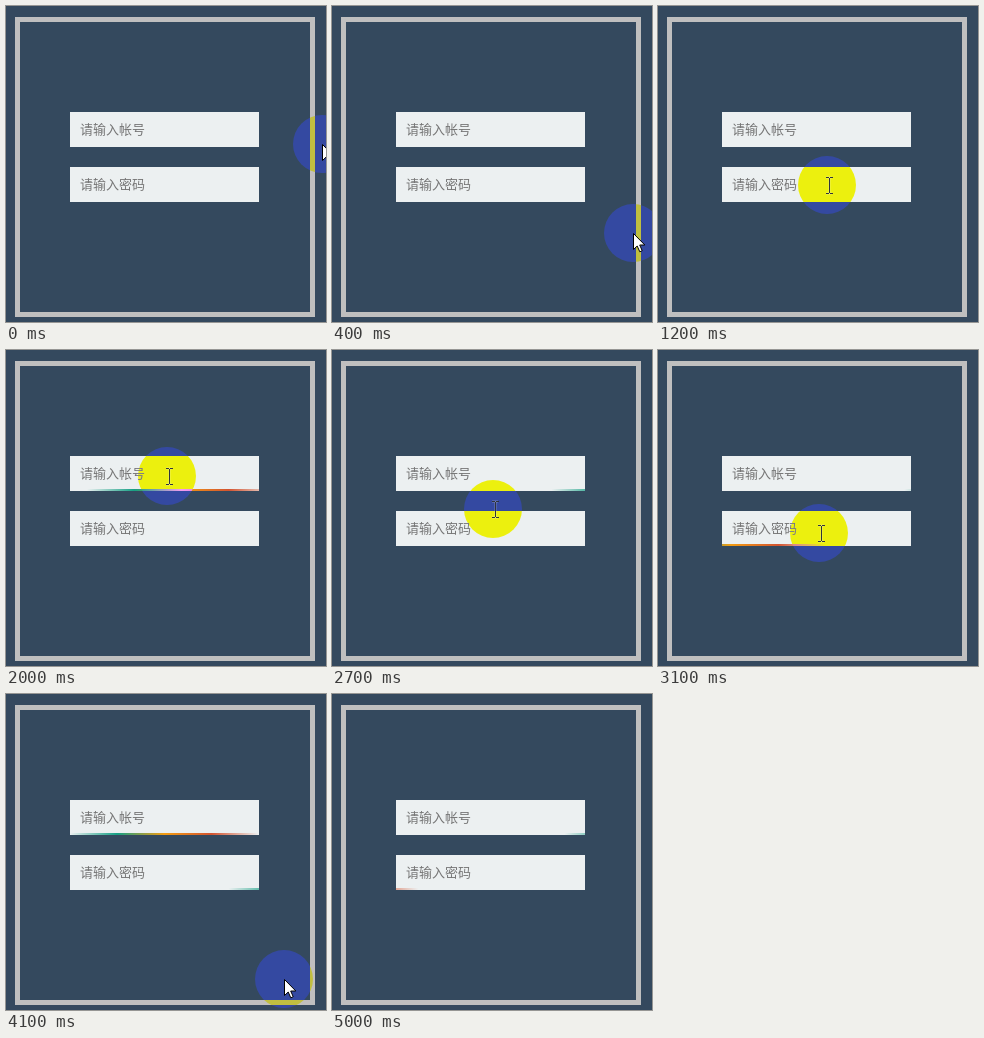
Write an HTML page that moves like this. It is 320 px wide and 316 px high and loops after 5100 ms.

```html
<!DOCTYPE html>
<html lang="zh">
<head>
<meta charset="utf-8">
<title>Login form</title>
<style>
  html, body { margin: 0; width: 100%; height: 100%; overflow: hidden; background: #34495e; }
  svg { display: block; }
  text { font: 13px "Noto Sans CJK SC", "Noto Sans CJK", sans-serif; fill: #757575; }
  #spot { fill: #00f; mix-blend-mode: difference; }
</style>
</head>
<body>
<svg width="320" height="316">
  <defs>
    <linearGradient id="rainbow">
      <stop offset="0" stop-color="#16a085" stop-opacity="0"/>
      <stop offset=".25" stop-color="#16a085"/>
      <stop offset=".5" stop-color="#f39c12"/>
      <stop offset=".75" stop-color="#d35430"/>
      <stop offset="1" stop-color="#d35430" stop-opacity="0"/>
    </linearGradient>
  </defs>
  <rect width="320" height="316" fill="#34495e"/>
  <rect x="11.5" y="13.5" width="295" height="295" fill="none" stroke="#bfbfbf" stroke-width="5"/>
  <svg x="64" y="106" width="189" height="35">
    <rect width="189" height="35" fill="#ecf0f1"/>
    <text x="10" y="22">请输入帐号</text>
    <rect class="line" y="33" width="189" height="2" fill="url(#rainbow)"/>
  </svg>
  <svg x="64" y="161" width="189" height="35">
    <rect width="189" height="35" fill="#ecf0f1"/>
    <text x="10" y="22">请输入密码</text>
    <rect class="line" y="33" width="189" height="2" fill="url(#rainbow)"/>
  </svg>
  <circle id="spot" r="29"/>
  <path id="arrow" d="M.5 .5V16.5L4.2 13L6.8 18.8L9.2 17.7L6.7 12H11.8Z" fill="#fff" stroke="#000"/>
  <g id="beam" fill="none">
    <path d="M-1 -7.5H5M-1 8.5H5M2.5 -7V8" stroke="#fff" stroke-opacity=".3" stroke-width="2"/>
    <path d="M-1 -7.5H2M3 -7.5H6M-1 8.5H2M3 8.5H6M2.5 -7V8" stroke="#30343c"/>
  </g>
</svg>
<script>
const LOOP = 5100, STEP = 100, SWEEP = 2150, WIDTH = 189;
const lineStarts = [1320, 2690];
const lines = document.querySelectorAll('.line');
const [spot, arrow, beam] = ['spot', 'arrow', 'beam'].map(id => document.getElementById(id));

// Pointer route: time, x, y
const route = [
  [0, 316, 138], [200, 316, 175], [400, 301, 227], [500, 270, 250], [600, 229, 255],
  [800, 145, 232], [900, 103, 195], [1000, 106, 158], [1100, 135, 148], [1200, 169, 179],
  [1300, 165, 148], [1400, 161, 126], [2500, 161, 126], [2700, 161, 159], [2900, 161, 183],
  [3700, 161, 183], [3900, 215, 235], [4200, 310, 310], [4300, 360, 355], [LOOP, 360, 355]
];

function pointerAt(t) {
  const i = route.findIndex(p => p[0] > t);
  const [t0, x0, y0] = route[i - 1], [t1, x1, y1] = route[i];
  const k = (t - t0) / (t1 - t0);
  return [x0 + (x1 - x0) * k, y0 + (y1 - y0) * k];
}

// The CSS "ease" curve, cubic-bezier(.25, .1, .25, 1)
function ease(x) {
  const bezier = (s, a, b) => 3 * (1 - s) ** 2 * s * a + 3 * (1 - s) * s * s * b + s ** 3;
  let low = 0, high = 1;
  for (let i = 0; i < 20; i++) {
    const mid = (low + high) / 2;
    if (bezier(mid, .25, .25) < x) low = mid; else high = mid;
  }
  return bezier(low, .1, 1);
}

function draw(now) {
  const t = Math.floor(now % LOOP / STEP) * STEP;

  lines.forEach((line, i) => {
    const age = Math.max(0, t - lineStarts[i]);
    line.setAttribute('x', WIDTH * (2 * ease(age % SWEEP / SWEEP) - 1));
  });

  const [x, y] = pointerAt(t).map(Math.round);
  const overField = x > 62 && x < 251 && [106, 161].some(top => y + 2 >= top && y + 2 < top + 35);
  for (const part of [spot, arrow, beam]) part.setAttribute('transform', `translate(${x} ${y})`);
  arrow.setAttribute('visibility', overField ? 'hidden' : 'visible');
  beam.setAttribute('visibility', overField ? 'visible' : 'hidden');

  requestAnimationFrame(draw);
}
requestAnimationFrame(draw);
</script>
</body>
</html>
```
